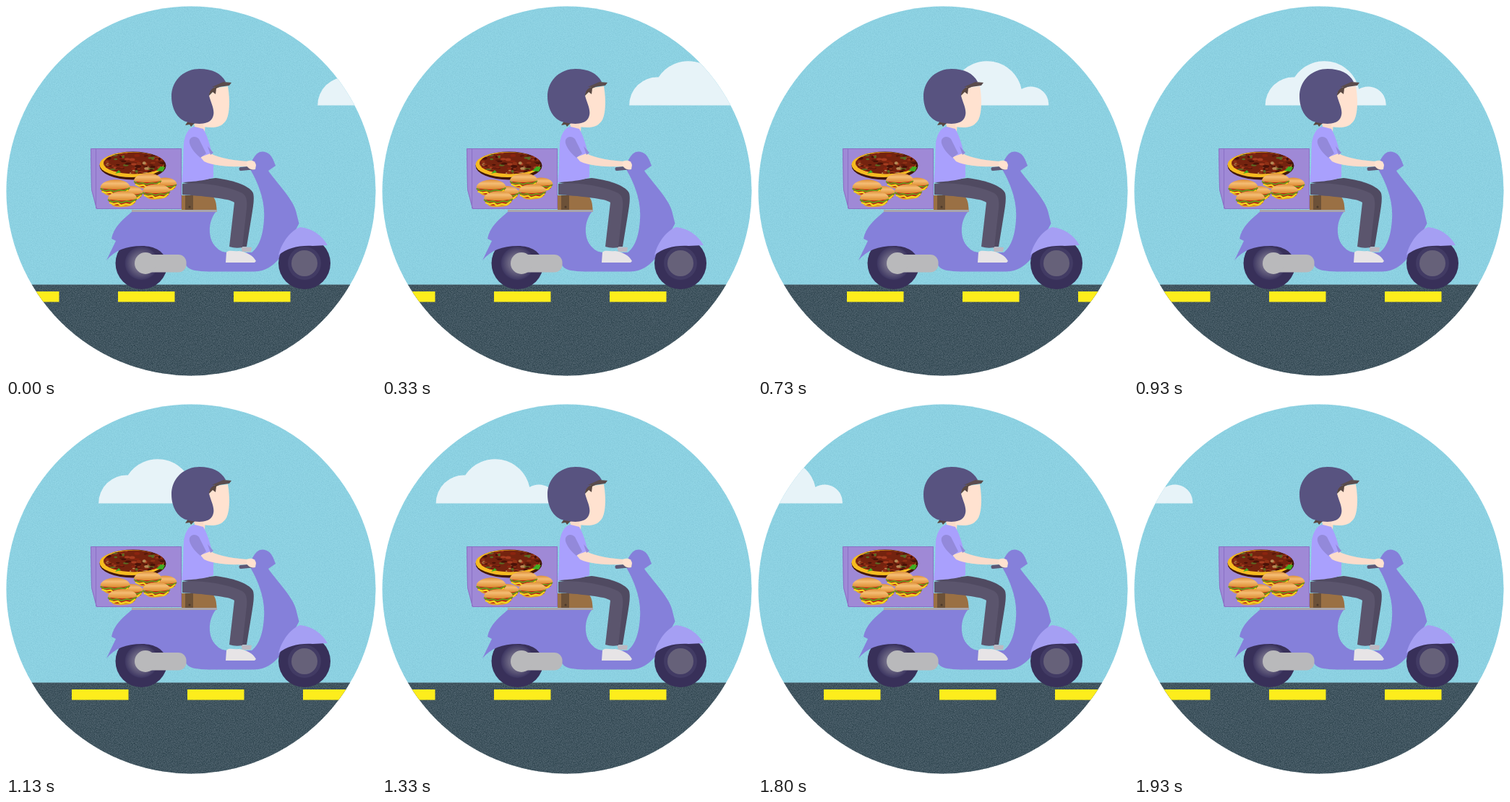
Write an HTML page that moves like this. It is 512 px wide and 512 px high and loops after 2070 ms.

```html
<!DOCTYPE html>
<html lang="en">
<head>
<meta charset="utf-8">
<title>Delivery scooter</title>
<style>
  html, body { margin: 0; width: 100%; height: 100%; overflow: hidden; background: #fff; }
  svg { display: block; width: 100vw; height: 100vh; }
</style>
</head>
<body>
<svg viewBox="0 0 512 512">
  <defs>
    <clipPath id="disc"><circle cx="256" cy="256" r="255.5"/></clipPath>
    <clipPath id="topping"><ellipse cx="177" cy="217.500" rx="42" ry="15"/></clipPath>
    <filter id="skyGrain" x="0" y="0" width="1" height="1" color-interpolation-filters="sRGB">
      <feTurbulence type="fractalNoise" baseFrequency=".8" numOctaves="3" seed="4"/>
      <feColorMatrix values="0 0 0 0 .42  0 0 0 0 .7  0 0 0 0 .78  .7 0 0 0 -.2"/>
    </filter>
    <filter id="roadGrain" x="0" y="0" width="1" height="1" color-interpolation-filters="sRGB">
      <feTurbulence type="fractalNoise" baseFrequency=".85" numOctaves="3" seed="9"/>
      <feColorMatrix values="0 0 0 0 .13  0 0 0 0 .22  0 0 0 0 .26  1.5 0 0 0 -.4"/>
    </filter>
    <radialGradient id="rearHub">
      <stop offset=".45" stop-color="#716c87"/>
      <stop offset="1" stop-color="#3d3661"/>
    </radialGradient>
    <linearGradient id="bun" x2="0" y2="1">
      <stop stop-color="#df9038"/>
      <stop offset=".4" stop-color="#f5bd74"/>
      <stop offset="1" stop-color="#dc8a2e"/>
    </linearGradient>
    <g id="burger">
      <path d="M-17 3Q-16 10 -8 11Q7 12 15 8L18 1Z" fill="#e2a032"/>
      <path d="M-20 1L-17 6L-9 9L-2 9L9 8L17 6L20 0Z" fill="#b8281a"/>
      <path d="M-18 5L-12 7L-6 6L-2 9L5 7L11 8L18 3" fill="none" stroke="#f4d91d" stroke-width="2.200"/>
      <path d="M-20 1L-14 4L-8 3L-1 5L6 3L12 4L20 0" fill="none" stroke="#6a991c" stroke-width="2"/>
      <path d="M-20 0C-20 -7 -9 -11 1 -11C12 -11 20 -6 20 -1C14 3 -10 3 -20 0Z" fill="url(#bun)"/>
    </g>
  </defs>
  <g clip-path="url(#disc)">
    <rect width="512" height="386" fill="#92d6e6"/>
    <rect width="512" height="386" filter="url(#skyGrain)"/>
    <path id="cloud" fill="#e7f3f8" d="M0 137.5A38.500 38.500 0 0 1 40.500 98.500A49 49 0 0 1 129.500 115A24.700 24.700 0 0 1 167 137.500Z"/>
    <rect y="385.500" width="512" height="127" fill="#526570"/>
    <rect y="386" width="512" height="126" filter="url(#roadGrain)"/>
    <path id="dashes" stroke="#fded1c" stroke-width="14.400" stroke-dasharray="78.500 81.500" d="M-165 402.300H640"/>
  </g>

  <g id="box">
    <path d="M117 197H243V281H125L118 254Z" fill="#9f89d6"/>
    <path d="M117.500 197.500H242.500V280.500H125.500L118.500 254ZM124.500 198V280" fill="none" stroke="#8a70c5"/>
    <ellipse cx="175.500" cy="221" rx="46" ry="19.500" fill="#42180b"/>
    <ellipse cx="174" cy="219.500" rx="44.500" ry="17.500" fill="#f6bb20"/>
    <ellipse cx="177" cy="217.500" rx="42" ry="15" fill="#74230f"/>
    <g id="specks" clip-path="url(#topping)"/>
    <path d="M208 228L214 222L220 223L217 229ZM151 232L156 227L159 230Z" fill="#3fae22"/>
    <g id="burgers"/>
  </g>

  <g id="scooter">
    <path d="M243 262H283Q291 264 291.500 282H243Z" fill="#9a7044"/>
    <path d="M248 262H259V282H248Z" fill="#6c5138"/>
    <circle cx="254" cy="278" r="1.500" fill="#4b3829"/>
    <circle cx="187.500" cy="356" r="36" fill="#383059"/>
    <circle cx="187.500" cy="356" r="23" fill="url(#rearHub)"/>
    <path d="M175 284H291C279 298 279 322 290 333C296 340 302 341 308 341H340C351 333 356 315 357 295C359 270 349 245 338 226L340 215C345 206 349 200 358 202C366 203 370 212 373 221L363 228C374 244 396 266 401 283L405.500 301L398 315C388 336 374 367 344 367.500H285C262 367 251 366 248 356H222C221 340 206 332 188 332C166 332 151 338 139 352L152 325L146 322C149 306 161 296 175 284Z" fill="#8580da"/>
    <path d="M174 283.500H292" stroke="#aaa5ab" stroke-width="3"/>
    <rect x="184" y="344" width="65.500" height="24.500" rx="11" fill="#b9b9bb"/>
    <circle cx="193" cy="356" r="15" fill="#b9b9bb"/>
    <circle cx="413" cy="356" r="36" fill="#383059"/>
    <circle cx="413" cy="356" r="23" fill="#423b64"/>
    <circle cx="413" cy="356" r="18" fill="#666179"/>
    <path d="M377 345C382 326 394 311 407 306C424 308 437 317 445 331L424 332C405 331 389 335 377 345Z" fill="#a59ff3"/>
  </g>

  <g id="rider">
    <path d="M325 333L340 334L339 340H327Z" fill="#bcb8c1"/>
    <path d="M244 244L290 238C315 241 338 249 342 259C344 266 342 278 340 290L333 333H320V262Z" fill="#504a61"/>
    <path d="M244 246C270 243 310 250 327 259C333 263 334 270 333 280L327 334Q318 336 309 333L316 272C313 267 275 263 244 261Z" fill="#5b556d"/>
    <path d="M304 355L305 341C308 337 315 340 322 339C332 340 342 345 346 353L344 355Z" fill="#e7e4e6"/>
    <path d="M259 158L276 160L275 174L262 171Z" fill="#fadac8"/>
    <path d="M248 165L252 159H265L259 164L256 167L254 164Z" fill="#5a4842"/>
    <path d="M275 130L292 113L307 111C310 128 310 150 304 159C297 169 287 169 273 167Z" fill="#ffe2d0"/>
    <path d="M246 190C248 175 254 168 261 167L273 170C280 182 285 200 287 218V237C275 242 258 243 243 244C246 224 245 204 246 190Z" fill="#a9a0fd"/>
    <path d="M269 209L283 204C296 211 318 214 335 215L336 222C315 223 288 222 274 215Z" fill="#fbdccb"/>
    <path d="M254 190C252 181 262 178 267 184L277 204L269 210C263 205 257 199 254 190ZM279 194L287 203L283 206Z" fill="#9389da"/>
    <path d="M325 225.500L341 224" stroke="#5d5874" stroke-width="5" stroke-linecap="round"/>
    <path d="M333 215Q344 211 346 220L345 226Q337 228 333 221Z" fill="#ffe2d0"/>
    <path d="M280 125L283 113L298 111L291 114L290 122L286 119Z" fill="#5a4842"/>
    <path d="M304 105C298 93 285 87 268 87C245 87 229 104 229 125C229 142 237 156 249 160C263 164 279 165 285 156C291 146 284 136 281 124C281 115 289 111 304 105Z" fill="#585380"/>
    <path d="M285 112L301 105L312 106L309 110L295 112Z" fill="#5b4c4d"/>
  </g>
</svg>
<script>
const SVG = "http://www.w3.org/2000/svg";
const byId = id => document.getElementById(id);

function add(parent, tag, attrs) {
  const node = document.createElementNS(SVG, tag);
  for (const key in attrs) node.setAttribute(key, attrs[key]);
  byId(parent).append(node);
}

let seed = 17;
const random = () => (seed = seed * 16807 % 2147483647) / 2147483647;

const toppingColors = ["#a63c20", "#491208", "#8f3015", "#b58a55", "#5a1a0a", "#5b6a22", "#8b2410"];
for (let i = 0; i < 110; i++) {
  add("specks", "ellipse", {
    cx: 134 + 84 * random(), cy: 203 + 30 * random(),
    rx: 1.5 + 3 * random(), ry: 0.8 + 1.3 * random(),
    fill: toppingColors[Math.floor(random() * toppingColors.length)]
  });
}

// Back to front: x, y, scale
[[219, 247, .86], [196, 242, .95], [208, 257, .95], [171, 259, .92], [151, 251.5, 1.02], [161, 267, 1]]
  .forEach(([x, y, s]) => add("burgers", "use", {
    href: "#burger", transform: `translate(${x} ${y}) scale(${s})`
  }));

const LOOP = 2070, STEPS = 30;
const stepStart = i => Math.round(i * 20 / 3) * 10;

function stepAt(time) {
  let step = STEPS - 1;
  while (stepStart(step) > time) step--;
  return step;
}

function draw(time) {
  const step = stepAt(time % LOOP);
  const dashShift = (step * 128) % 160;
  byId("cloud").setAttribute("transform", `translate(${431.3 - 17.83 * step} 0)`);
  byId("dashes").setAttribute("transform", `translate(${dashShift} 0)`);
}

const start = performance.now();
function tick() {
  draw(performance.now() - start);
  requestAnimationFrame(tick);
}
tick();
</script>
</body>
</html>
```
